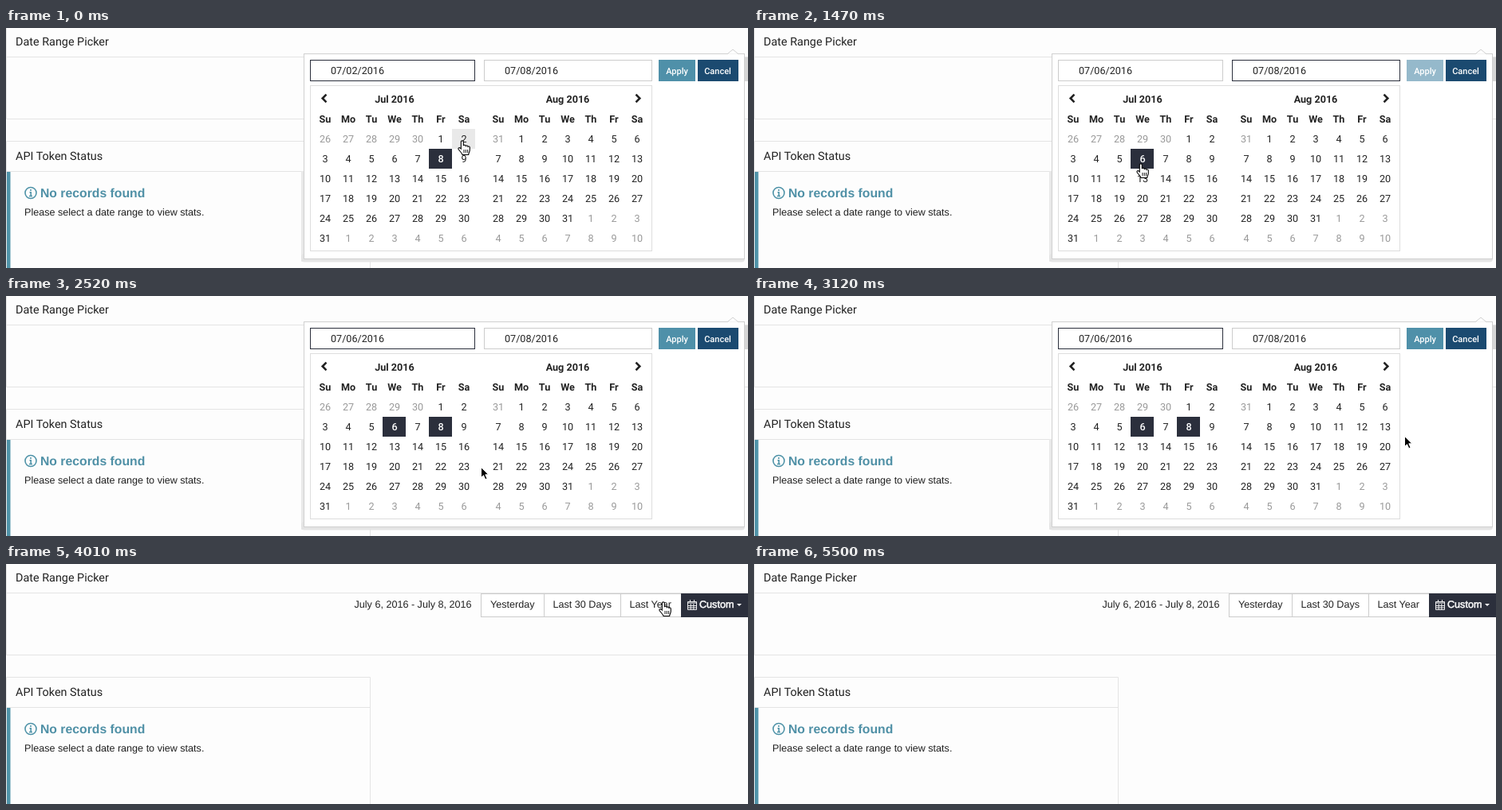
Write an HTML page that moves like this. It is 930x302 px and loops after 5790 ms.

```html
<!DOCTYPE html>
<html lang="en">
<head>
<meta charset="utf-8">
<title>Date Range Picker</title>
<style>
html, body { margin: 0; width: 100%; height: 100%; overflow: hidden; background: #fdfdfd; }
svg { display: block; width: 930px; height: 302px; }
text { font: 12.6px "Liberation Sans", Arial, sans-serif; fill: #222; text-rendering: geometricPrecision; white-space: pre; }
.head { font: 14.4px Roboto, sans-serif; }
.title { font-size: 15.75px; font-weight: bold; fill: #4f90a6; }
.num { font: 12.6px Roboto, sans-serif; }
.off { fill: #999; }
.bold { font-weight: 700; }
.on { font-weight: 500; fill: #fff; }
.btn { font: 500 11px Roboto, sans-serif; fill: #fff; }
.custom { fill: #fff; stroke: #fff; stroke-width: .5; }
.mid { text-anchor: middle; }
</style>
</head>
<body>
<svg id="stage" viewBox="0 0 930 302"></svg>
<script>
const LOOP = 5790;
const FIRST_CLICK = 1470, SECOND_CLICK = 2220, CLOSE = 4010, HOVER = 4160, LEAVE = 5200, GONE = 5500;

// time, pointer x, pointer y
const steps = [
  [0, 572, 142], [140, 567, 145], [290, 556, 153], [440, 541, 162], [580, 522, 170],
  [730, 507, 173], [880, 498, 172], [1030, 490, 171], [1170, 485, 171],
  [1470, 485, 171], [1620, 503, 171], [1770, 527, 170], [1920, 551, 169],
  [2220, 551, 169], [2520, 595, 215], [2670, 689, 275],
  [3120, 815, 176], [3270, 822, 135], [3410, 826, 92], [3560, 825, 60], [3710, 824, 51],
  [3860, 824, 48], [4010, 824, 48], [4160, 824, 48],
  [5200, 843, 150], [5350, 863, 284], [5500, 863, 302]
];

const rect = (x, y, w, h, fill, stroke) => stroke
  ? `<rect x="${x + .5}" y="${y + .5}" width="${w - 1}" height="${h - 1}" fill="${fill}" stroke="${stroke}"/>`
  : `<rect x="${x}" y="${y}" width="${w}" height="${h}" fill="${fill}"/>`;
const text = (x, y, s, cls = '') => `<text x="${x}" y="${y}" class="${cls}">${s}</text>`;
const path = (d, stroke, width, fill = 'none') =>
  `<path d="${d}" fill="${fill}" stroke="${stroke}" stroke-width="${width}"/>`;

const pad = n => String(n).padStart(2, '0');
const format = d => `${pad(d.getMonth() + 1)}/${pad(d.getDate())}/${d.getFullYear()}`;
const july = day => new Date(2016, 6, day);

// All day cells of both months
const cells = [];
for (const [month, left, first] of [[6, 385, -4], [7, 602, 0]]) {
  for (let i = 0; i < 42; i++) {
    const date = new Date(2016, month, first + i);
    cells.push({ date, x: left + i % 7 * 29, y: 127 + Math.floor(i / 7) * 25, off: date.getMonth() != month });
  }
}

function page() {
  const teal = '#4f93a8', line = '#e4e4e4';
  return rect(0, 0, 930, 302, '#fdfdfd') +
    path('M.5 0V114.5H930M0 36.5H930M.5 302V142.5H456.5V302M0 180.5H456', line, 1) +
    text(12, 22, 'Date Range Picker', 'head') +
    text(12, 166, 'API Token Status', 'head') +
    rect(1, 181, 4.5, 121, teal) +
    `<circle cx="31" cy="207.5" r="7" fill="none" stroke="${teal}" stroke-width="1.6"/>` +
    path('M31 203v2M29.5 206.8H31.2V211.5M29 211.5H33', teal, 1.6) +
    text(43, 213, 'No records found', 'title') +
    text(23, 236, 'Please select a date range to view stats.');
}

function toolbar(hover) {
  const dark = '#2b2f3c';
  return text(436.5, 55, 'July 6, 2016 - July 8, 2016') +
    rect(595, 37, 80, 30, '#fff', '#ccc') + text(607, 55, 'Yesterday') +
    rect(674, 37, 97, 30, '#fff', '#ccc') + text(685.5, 55, 'Last 30 Days') +
    rect(770, 37, 77, 30, hover ? '#e8e8e8' : '#fff', '#ccc') + text(781.5, 55, 'Last Year') +
    rect(846, 37, 84, 30, dark) +
    path('M854.5 47.5H865.5V57.5H854.5ZM854 49H866M854.5 52.5H865.5M854.5 55H865.5M858.2 50V57M861.8 50V57M857.5 45V48M862.5 45V48', '#fff', .9) +
    text(869, 55, 'Custom', 'custom') +
    path('M916 50h6l-3 3z', 'none', 0, '#fff');
}

function picker(t, hover, moved) {
  const phase = t < FIRST_CLICK ? 0 : t < SECOND_CLICK ? 1 : 2;
  const chosen = [[8], [6], [6, 8]][phase].map(d => +july(d));
  const preview = hover && moved ? hover.date : null;
  const start = phase != 1 && preview || july(6);
  const end = phase == 1 && preview || july(8);
  const border = on => on ? '#2b2f3c' : '#ccc';

  let s = rect(926, 37, 4, 30, '#d6d6d6') +
    rect(370, 180, 3, 114, '#e9e9e9') +
    `<rect x="370" y="284" width="556" height="10.5" rx="4" fill="#e4e4e4"/>` +
    rect(373, 32, 553, 259, '#fff', '#d0d0d0') +
    path('M904 32.8L911 27L918 32.8', '#d0d0d0', 1, '#fff') +
    rect(381, 40, 207, 27, '#fff', border(phase != 1)) + text(407, 58, format(start), 'num') +
    rect(599, 40, 211, 27, '#fff', border(phase == 1)) + text(625, 58, format(end), 'num') +
    rect(818, 40, 46, 27, phase == 1 ? '#95b9cb' : '#4f90a9') + text(841, 57.5, 'Apply', 'btn mid') +
    rect(867, 40, 51, 27, '#1b4a70') + text(892, 57.5, 'Cancel', 'btn mid') +
    rect(381, 72, 429, 209, '#fff', '#ddd') +
    path('M401.5 83.7L396.7 88.5L401.5 93.3M789.5 83.7L794.3 88.5L789.5 93.3', '#222', 2.6) +
    text(487, 94, 'Jul 2016', 'num bold mid') + text(704, 94, 'Aug 2016', 'num bold mid');

  for (const x of [400, 617])
    ['Su', 'Mo', 'Tu', 'We', 'Th', 'Fr', 'Sa'].forEach((day, i) => s += text(x + i * 29, 119, day, 'num bold mid'));

  for (const c of cells) {
    const on = chosen.includes(+c.date);
    if (on) s += rect(c.x, c.y, 29, 25, '#2b2f3c');
    else if (c == hover) s += rect(c.x, c.y, 29, 25, '#e9e9e9');
    s += text(c.x + 15, c.y + 17, c.date.getDate(), 'num mid ' + (on ? 'on' : c.off ? 'off' : ''));
  }
  return s;
}

function pointer(x, y, hand) {
  const shape = hand
    ? path('M-1.7 10V1.3a1.5 1.5 0 0 1 3 0V6c.5-1.2 2.8-1 3 .5 .6-.9 2.5-.6 2.7 .8 .8-.7 2.3-.2 2.3 1.2v3c0 2.5-1.6 3.5-1.6 6H0c-.3-2-3.5-4.7-4.8-6.8 -1-2 1.2-3 3.1-.7z', '#000', 1.1, '#fff') +
      path('M2 11v4M4.3 11v4M6.6 11v4', '#000', .9)
    : path('M.5 .5V13.5L3.5 10.7L5.8 15.8L8 14.8L5.8 9.8H9.8Z', '#fff', 1, '#000');
  return `<g transform="translate(${x} ${y})">${shape}</g>`;
}

function draw(i) {
  const [t, x, y] = steps[i], open = t < CLOSE;
  const hover = open && cells.find(c => x >= c.x && x < c.x + 29 && y >= c.y && y < c.y + 25);
  const moved = !i || x != steps[i - 1][1] || y != steps[i - 1][2];
  const hand = hover || t >= 3560 && t < LEAVE;
  stage.innerHTML = page() +
    (open ? picker(t, hover, moved) : toolbar(t >= HOVER && t < LEAVE)) +
    (t < GONE ? pointer(x, y, hand) : '');
}

const stage = document.getElementById('stage');
const begin = performance.now();
let shown = -1;
function tick() {
  const t = (performance.now() - begin) % LOOP;
  const i = steps.filter(s => s[0] <= t).length - 1;
  if (i != shown) draw(shown = i);
  requestAnimationFrame(tick);
}
tick();
</script>
</body>
</html>
```
